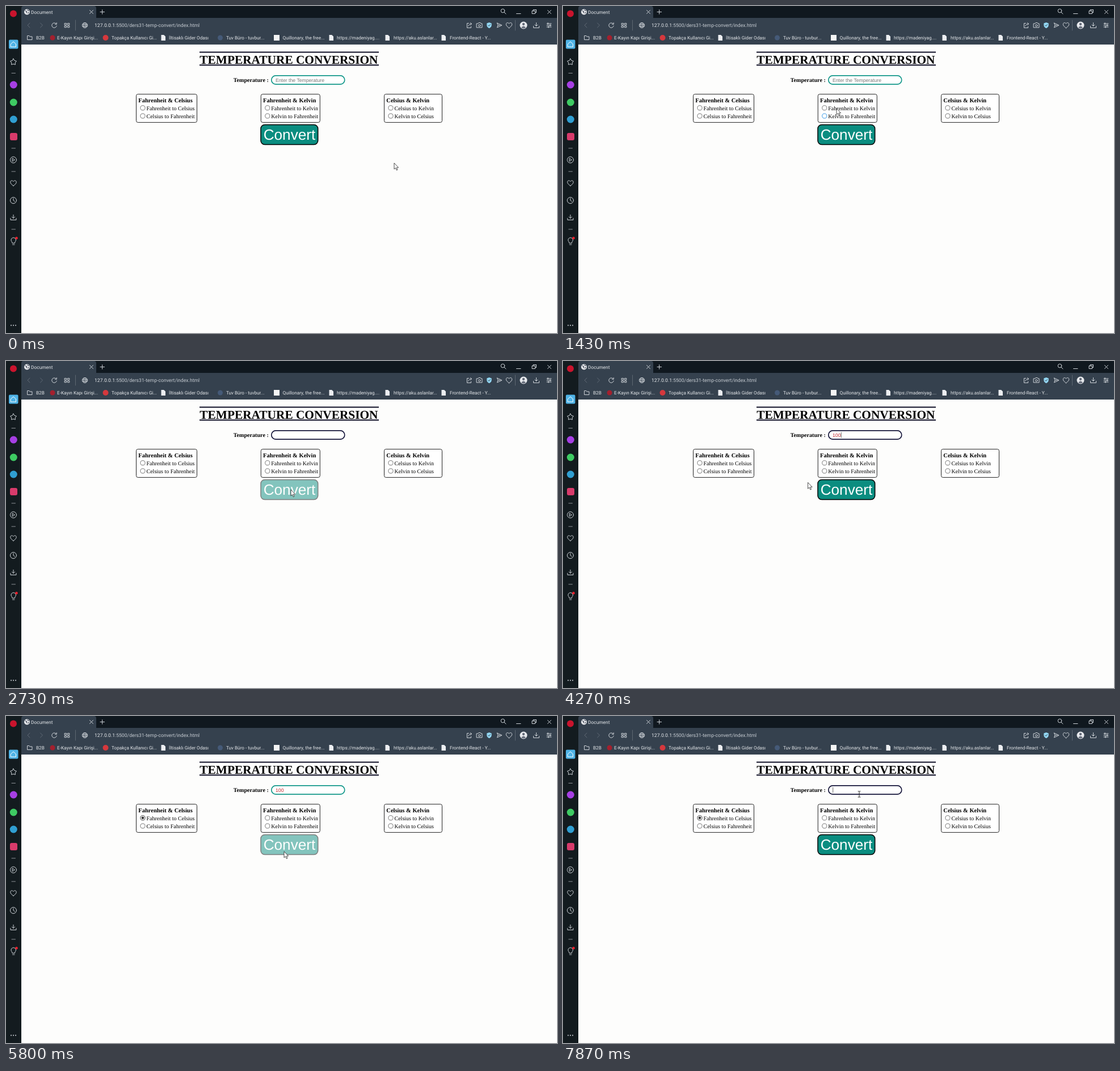
These frames come from a looping animation (971x577 px, 8000 ms). An HTML page:

```html
<!DOCTYPE html>
<html lang="en">
<head>
<meta charset="utf-8">
<title>Temperature conversion</title>
<style>
  html, body { margin: 0; width: 100%; height: 100%; overflow: hidden; background: #fdfdfc; }
  svg { display: block; width: 971px; height: 577px; text-rendering: geometricPrecision; }
  .ui { font-family: Roboto, "Open Sans", sans-serif; fill: #e4e7ea; }
  .serif { font-family: "Liberation Serif", "Times New Roman", serif; fill: #000; }
  .sans { font-family: "Liberation Sans", Arial, sans-serif; }
  .icon { fill: none; stroke: #ced3d8; stroke-width: 1; stroke-linecap: round; stroke-linejoin: round; }
  .bold { font-weight: bold; }
</style>
</head>
<body>
<svg id="stage" viewBox="0 0 971 577" xmlns="http://www.w3.org/2000/svg">
  <defs>
    <path id="heart" d="M0 4.8C-3 2.5-5.2.8-5.2-1.8C-5.2-4.8-1.6-5.4 0-2.8C1.6-5.4 5.2-4.8 5.2-1.8C5.2.8 3 2.5 0 4.8Z"/>
    <path id="download" d="M0-4.5V1.5M-2.5-1L0 1.5L2.5-1M-5 1.5V4.5H5V1.5"/>
    <g id="globe"><circle r="4.6"/><ellipse rx="2" ry="4.6"/><path d="M-4.2-1.6H4.2M-4.2 1.6H4.2"/></g>
    <path id="file" d="M-3.5-5H1.2L4-2.2V5H-3.5Z" fill="#eceef1" stroke="none"/>
    <path id="cross" d="M-3-3L3 3M3-3L-3 3"/>
  </defs>

  <rect width="971" height="577" fill="#fdfdfc"/>
  <rect width="971" height="22" fill="#10181f"/>
  <path d="M27 21V4Q27 0 31 0H155Q159 0 159 4V21H971V68H27Z" fill="#35414e"/>
  <rect width="27" height="577" fill="#131b1f"/>

  <g id="chrome" class="icon">
    <!-- sidebar -->
    <circle cx="13" cy="13.500" r="6" fill="#c9142d" stroke="none"/>
    <rect x="5" y="59.500" width="16.500" height="16" rx="2" fill="#4fb3e6" stroke="none"/>
    <path d="M8.500 67L13 63L17.500 67V72H8.500Z" stroke="#fff"/>
    <path d="M13 93L14.900 96.200L18.500 97.300L16.200 100L16.400 103.500L13 102.300L9.600 103.500L9.800 100L7.500 97.300L11.100 96.200Z"/>
    <path d="M10 118.500H16.500M10 251H16.500M10 292H16.500M10 394H16.500" stroke="#8d9197"/>
    <circle cx="13.300" cy="139" r="6.500" fill="#a63fe4" stroke="none"/>
    <circle cx="13.300" cy="170" r="6.500" fill="#3ecb63" stroke="none"/>
    <circle cx="13.300" cy="200" r="6.500" fill="#309fd2" stroke="none"/>
    <rect x="7" y="224" width="13" height="13" rx="3" fill="#d83b6b" stroke="none"/>
    <circle cx="13" cy="271.500" r="5.500"/><path d="M11.500 269L15.500 271.500L11.500 274Z"/>
    <use href="#heart" x="13" y="312.500"/>
    <circle cx="13" cy="343" r="5.500"/><path d="M13 339.500V343L15.500 345"/>
    <use href="#download" x="13" y="373"/>
    <path d="M11 418C11 416 9 415.500 9 413A4.200 4.200 0 0 1 17.400 413C17.400 415.500 15.400 416 15.400 418ZM11.500 421H15"/>
    <circle cx="18.500" cy="409.500" r="2.300" fill="#f3212d" stroke="none"/>
    <path d="M9 563.500h.1M13 563.500h.1M17 563.500h.1" stroke-width="2"/>

    <!-- tab strip -->
    <circle cx="37" cy="10.500" r="5" fill="#e9ebee" stroke="none"/>
    <path d="M34 8.500L36.500 9.500L36 12M38 7L40 8.500M38.500 12.500L40 11.500" stroke="#3a4050" stroke-width="1.300"/>
    <use href="#cross" x="150.500" y="10.500"/>
    <path d="M166 10.500H173.500M169.700 6.700V14.200"/>
    <circle cx="875.500" cy="8.500" r="3.300"/><path d="M878 11L881 14"/>
    <path d="M899.500 13.500H907M927 9V13.500H932.500V9ZM929 9V6.500H934.500V11.500H932.500"/>
    <use href="#cross" x="957.500" y="10.500"/>

    <!-- toolbar -->
    <path d="M42 30L38 34L42 38M60.500 30L64.500 34L60.500 38" stroke="#5f6974"/>
    <path d="M88.500 31.500A4.300 4.300 0 1 0 89.300 35M89.200 29.500V32.200H86.500"/>
    <path d="M103.500 30.500h3v2.800h-3ZM108.800 30.500h3v2.800h-3ZM103.500 35h3v2.800h-3ZM108.800 35h3v2.800h-3Z"/>
    <path d="M122.500 25V43M897.500 25V43" stroke="#5d6772"/>
    <use href="#globe" x="139" y="34"/>
    <path d="M815.500 30.500H812.500V38.500H819.500V36M815 35.500C815.500 32.500 817 31.500 820.500 31.500M818.500 29.500L820.700 31.500L818.500 33.500"/>
    <path d="M829.500 31H832L833 29.500H836L837 31H839V38H829.500Z"/><circle cx="834.300" cy="34.500" r="1.800"/>
    <path d="M851.500 29L855.700 30.500V34Q855.500 37.500 851.500 39.300Q847.500 37.500 847.300 34V30.500Z" fill="#93d7f3" stroke="none"/>
    <path d="M849.700 34L851 35.400L853.500 32.600" stroke="#35414e"/>
    <path d="M865.500 30L874 34L865.500 38L867 34ZM867 34H871"/>
    <use href="#heart" x="886.500" y="34"/>
    <circle cx="912" cy="34" r="6.500" fill="#e7e9ed" stroke="none"/>
    <circle cx="912" cy="32" r="2.200" fill="#646b79" stroke="none"/><path d="M908 38Q912 33 916 38Q912 41 908 38Z" fill="#646b79" stroke="none"/>
    <use href="#download" x="934.500" y="34"/>
    <path d="M953 31H961M953 34H961M953 37H961"/><path d="M955 30V32M959 33V35M956 36V38" stroke-width="1.500"/>

    <!-- bookmarks -->
    <path d="M38 52.500H41L42 54H46V59.500H38Z"/>
    <circle cx="82" cy="56" r="4.500" fill="#a3202e" stroke="none"/>
    <circle cx="175.500" cy="56" r="5" fill="#d5383d" stroke="none"/>
    <circle cx="377.500" cy="56" r="4.500" fill="#455a78" stroke="none"/>
    <rect x="472" y="51" width="10" height="10" fill="#f4f4f4" stroke="none"/>
    <use href="#file" x="277" y="56"/><use href="#file" x="573" y="56"/>
    <use href="#file" x="672" y="56"/><use href="#file" x="771" y="56"/>
  </g>

  <g class="ui">
    <text x="44" y="13.700" font-size="8.400">Document</text>
    <text x="156" y="37.300" font-size="8.670">127.0.0.1<tspan fill="#c6ccd2">:5500/ders31-temp-convert/index.html</tspan></text>
    <g id="bookmarks" font-size="8.200"></g>
  </g>

  <g class="serif">
    <text class="bold" x="341.300" y="102" font-size="21.340">TEMPERATURE CONVERSION</text>
    <path d="M341 81.500H657M341 104.300H657" stroke="#0c0c24" stroke-width="2"/>
    <text class="bold" x="400.800" y="134" font-size="10.100">Temperature :</text>
  </g>

  <rect id="field" x="467.800" y="122.900" width="129" height="15.200" rx="7.600" fill="#fff" stroke-width="1.700"/>
  <text id="value" class="sans" x="475" y="133.700" font-size="8.670"></text>
  <rect id="caret" y="125.500" width=".9" height="10" fill="#555"/>

  <g id="groups"></g>

  <g id="button">
    <rect x="449" y="209.500" width="100.700" height="35" rx="7" fill="#0b8d80" stroke="#000" stroke-width="1.500"/>
    <text class="sans" x="499.500" y="235.800" font-size="26.200" fill="#fff" text-anchor="middle">Convert</text>
  </g>

  <g id="result">
    <rect x="330.500" y="252" width="337" height="27" rx="13.500" fill="#0b8d80"/>
    <text class="serif" x="499" y="274.200" font-size="26.670" text-anchor="middle" style="fill:#fff">37.78</text>
  </g>

  <path id="arrow" d="M0 0V11L2.500 8.700L4.300 12.800L6 12L4.300 8.100H7.600Z" fill="#fff" stroke="#222" stroke-width=".8"/>
  <path id="beam" d="M-2.300-5.200H-.8L0-4.500L.8-5.200H2.300M0-4.500V4.500M-2.300 5.200H-.8L0 4.500L.8 5.200H2.300" fill="none" stroke="#222"/>
</svg>

<script>
const LOOP = 8000;
const HOVER_LAG = 60;
const FOCUS = 1980, BLUR = 4970, CONVERT = 6060, REFOCUS = 7700;
const BLINK = 530;
const KEYS = [3850, 3980, 4110];
const TEAL = '#14988a', NAVY = '#15153a';

const $ = id => document.getElementById(id);

function add(parent, tag, attrs, text = '') {
  const node = document.createElementNS('http://www.w3.org/2000/svg', tag);
  for (const name in attrs) node.setAttribute(name, attrs[name]);
  node.textContent = text;
  return parent.appendChild(node);
}

[
  [53, 'B2B'], [90, 'E-Kayın Kapı Girişi...'], [186, 'Topakça Kullanıcı Gi...'],
  [287, 'İltisaklı Gider Odası'], [388, 'Tuv Büro - tuvbur...'],
  [487.5, 'Quillonary, the free...'], [583, 'https://madeniyag....'],
  [683, 'https://aku.aslanlar...'], [782, 'Frontend-React - Y...']
].forEach(([x, label]) => add($('bookmarks'), 'text', { x, y: 59 }, label));

const radios = [];

function addGroup(x, width, from, to) {
  const box = $('groups');
  add(box, 'rect', { x, y: 155.6, width, height: 49.8, rx: 3, fill: '#fff', stroke: '#222' });
  add(box, 'text', { class: 'serif bold', x: x + 3.8, y: 170, 'font-size': 10.5 }, `${from} & ${to}`);
  [`${from} to ${to}`, `${to} to ${from}`].forEach((label, row) => {
    const cx = x + 11.5, cy = 179.8 + row * 14.2;
    const ring = add(box, 'circle', { cx, cy, r: 4.1, fill: '#fff' });
    const dot = add(box, 'circle', { cx, cy, r: 2.3, fill: '#333' });
    add(box, 'text', { class: 'serif', x: x + 18, y: cy + 4, 'font-size': 10 }, label);
    radios.push({ ring, dot, area: [cx - 5, cy - 7, x + width - 3, cy + 7.1] });
  });
}

addGroup(229.5, 107, 'Fahrenheit', 'Celsius');
addGroup(449.3, 104, 'Fahrenheit', 'Kelvin');
addGroup(666.5, 102, 'Celsius', 'Kelvin');

const easeIn = power => u => u ** power;
const easeOut = power => u => 1 - (1 - u) ** power;
const smooth = u => u * u * (3 - 2 * u);

// Pointer moves: start, end, target x, target y, easing
const MOVES = [
  [100, 1430, 482, 181, easeIn(1.6)],
  [1430, 1680, 482, 134, easeOut(1.5)],
  [2000, 2650, 502, 227, smooth],
  [3830, 4830, 241, 180, easeIn(1.6)],
  [4970, 5800, 490, 239, easeOut(3.22)],
  [6870, 7670, 522, 138, smooth]
];

function pointer(t) {
  let x = 684, y = 277;
  for (const [start, end, toX, toY, ease] of MOVES) {
    if (t <= start) break;
    const p = ease(Math.min(1, (t - start) / (end - start)));
    x += (toX - x) * p;
    y += (toY - y) * p;
  }
  return [x, y];
}

const inside = ([x, y], [left, top, right, bottom]) =>
  x >= left && x < right && y >= top && y < bottom;

const show = (node, visible) => node.setAttribute('visibility', visible ? 'visible' : 'hidden');

function render(t) {
  const at = pointer(t);
  const hovered = pointer(t - HOVER_LAG);
  const focused = (t >= FOCUS && t < BLUR) || t >= REFOCUS;
  const typed = t < REFOCUS ? '100'.slice(0, KEYS.filter(key => t >= key).length) : '';

  $('field').setAttribute('stroke', focused ? NAVY : TEAL);
  $('value').textContent = typed || (focused ? '' : 'Enter the Temperature');
  $('value').setAttribute('fill', typed ? '#c4252c' : '#757575');

  const blinkStart = Math.max(...[FOCUS, ...KEYS, REFOCUS].filter(time => time <= t));
  show($('caret'), focused && Math.floor((t - blinkStart) / BLINK) % 2 === 0);
  $('caret').setAttribute('x', 475.3 + typed.length * 4.82);

  radios.forEach(({ ring, dot, area }, i) => {
    const checked = i === 0 && t >= BLUR;
    ring.setAttribute('stroke', inside(hovered, area) ? '#3a9be8' : checked ? '#444' : '#767676');
    show(dot, checked);
  });

  $('button').setAttribute('opacity', inside(hovered, [448, 209, 550, 245]) ? 0.5 : 1);
  show($('result'), t >= CONVERT && t < REFOCUS);

  const overField = inside(at, [467, 122, 598, 139]);
  const place = `translate(${at[0].toFixed(2)} ${at[1].toFixed(2)})`;
  $('arrow').setAttribute('transform', place);
  $('beam').setAttribute('transform', place);
  show($('arrow'), !overField);
  show($('beam'), overField);
}

const origin = performance.now();
function tick() {
  render((performance.now() - origin) % LOOP);
  requestAnimationFrame(tick);
}
render(0);
requestAnimationFrame(tick);
</script>
</body>
</html>
```
